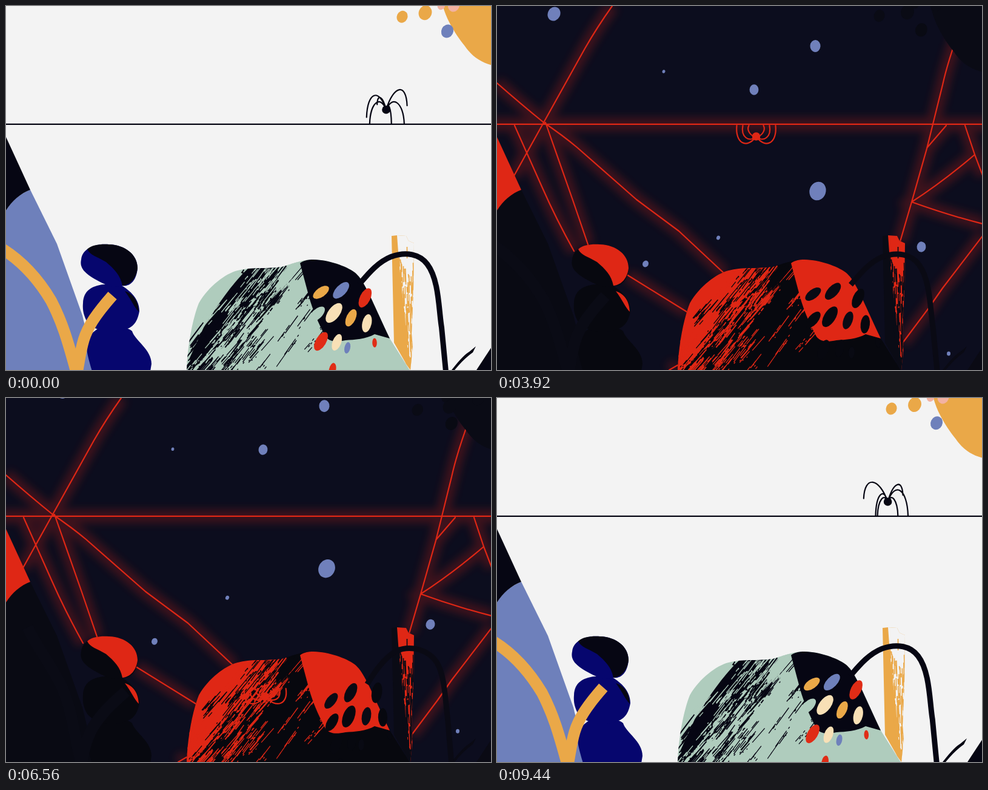
These frames come from a looping animation (800 px wide and 600 px high, 9.52 s). An HTML page:

```html
<!DOCTYPE html>
<html lang="en">
<head>
<meta charset="utf-8">
<title>Spider on a thread</title>
<style>
html, body { margin: 0; width: 100%; height: 100%; overflow: hidden; }
svg {
  display: block; width: 100vw; height: 100vh; background: var(--bg);
  --bg: #f3f3f3; --ink: #060613; --stem: #060613; --navy: #06066e; --blue: #6e80bb; --gold: #eaa848;
  --green: #afccbd; --red: #e02c16; --cream: #f8e0b6; --pink: #f3b2a2; --chalk: #f3f3f3;
}
svg.dark {
  --bg: #0c0d1e; --ink: #df2715; --chalk: #df2715; --stem: #0a0a14;
  --navy: #07080f; --blue: #090a13; --gold: #0a0b15; --green: #07080e;
  --red: #07080f; --cream: #07080f; --pink: #0a0b15;
}
.night { visibility: hidden; }
.dark .night { visibility: visible; }
.line { fill: none; stroke: var(--ink); stroke-width: 2.2; stroke-linecap: round; stroke-linejoin: round; }
.glow { fill: none; stroke: #df2715; stroke-width: 22; opacity: .23; }
.ink { fill: var(--ink); } .navy { fill: var(--navy); } .blue { fill: var(--blue); }
.gold { fill: var(--gold); } .green { fill: var(--green); } .red { fill: var(--red); }
.cream { fill: var(--cream); } .pink { fill: var(--pink); } .stem { fill: var(--stem); }
.star { fill: #7080bb; }
</style>
</head>
<body>
<svg id="stage" viewBox="0 0 800 600" preserveAspectRatio="none">
  <defs>
    <filter id="blur" filterUnits="userSpaceOnUse" x="-40" y="-40" width="880" height="680">
      <feGaussianBlur stdDeviation="7"/>
    </filter>
    <path id="rock" d="M298 602C299 560 308 515 318 490C334 462 362 441 382 436C402 430 430 434 455 430C475 424 490 418 505 418C530 418 560 428 575 439C592 452 605 490 633 548L667 602Z"/>
    <clipPath id="rockClip"><use href="#rock"/></clipPath>
    <path id="bar" d="M636 379L645 378L660 379L664 387L673 391L672 470L669 540L671 562L667 600L660 590L640 555Z"/>
    <clipPath id="barClip"><use href="#bar"/></clipPath>
    <path id="web" d="M190 0Q165 35 145 70L77 192L28 280M0 127Q40 162 77 192Q108 213 132 233L230 319L300 371L375 441M29 197L75 300Q97 350 127 404M80 192L125 320L150 393M216 444L313 504M284 600L298 592M770 20Q745 85 735 130L709 235L684 323L665 388M741 197L709 234M772 197L788 245L801 279M788 245Q735 290 684 323Q745 345 801 359M801 379L735 465L712 498L670 554"/>
  </defs>

  <g id="stars" class="night"></g>
  <g class="night">
    <g class="glow" filter="url(#blur)"><use href="#web"/><path d="M-40 195H840"/></g>
    <use href="#web" class="line"/>
  </g>
  <path class="line" d="M0 194.8H800"/>

  <path class="blue" d="M0 337C10 320 24 309 40 303L84 392L126 510L148 600H0Z"/>
  <path class="ink" d="M0 216L40 303C24 309 10 321 0 337Z"/>

  <path class="navy" d="M150 533C170 525 200 528 208 536C213 552 240 566 240 590L238 602H142C137 585 133 572 133 560C136 545 140 540 150 533Z"/>
  <path class="navy" d="M127 490C128 468 142 462 160 459H188C200 466 220 480 220 503C216 525 207 530 195 534C175 541 150 538 135 522C128 512 126 500 127 490Z"/>
  <path class="navy" d="M124 418C126 398 150 391 170 393C197 394 217 410 217 432C215 455 203 463 191 461C176 466 165 460 150 452C130 441 121 432 124 418Z"/>
  <path class="ink" d="M134 401C142 393 158 392 170 393C197 394 217 410 217 432C215 450 204 460 192 461C189 444 178 433 165 422C150 413 139 411 134 401Z"/>
  <path class="ink" d="M196 470C210 475 218 485 219 504C211 496 208 486 196 470Z"/>

  <use href="#bar" fill="var(--gold)"/>
  <path d="M645 378L660 379L664 387L673 391L672 470L669 540L671 562L667 600L662 560L656 500L648 420Z" fill="var(--chalk)"/>
  <path id="barScratch" clip-path="url(#barClip)" stroke="var(--gold)" stroke-width="1.7"/>

  <use href="#rock" fill="var(--green)"/>
  <g clip-path="url(#rockClip)" fill="none">
    <path class="ink night" d="M456 425L392 498L300 604H290V425Z"/>
    <path class="ink" d="M452 429L400 432C378 452 350 490 326 530L303 580L306 596C338 556 366 526 392 494C412 480 436 458 452 429Z"/>
    <g id="brush"></g>
  </g>
  <path class="ink" d="M485 424C492 418 505 418 505 418C530 418 560 428 575 439C592 452 605 490 633 548L608 541C594 549 575 550 560 551C545 554 534 554 527 545C518 528 508 508 500 480Z"/>

  <path class="stem" d="M776 600L801 562V600Z"/>
  <path class="stem" d="M735 600C745 588 754 576 764 570L775 561L770 571C760 578 750 588 740 600Z"/>
  <path id="vine" fill="none" stroke="var(--stem)" stroke-width="9"/>
  <g id="dots"></g>
  <path id="fork" fill="none" stroke="var(--gold)" stroke-width="19" stroke-linejoin="round"/>

  <path id="ball" class="gold" d="M716 -20C719 -5 724 12 732 27C740 42 748 54 757 65C770 84 784 92 802 97L840 100V-20Z"/>
  <g id="berries"></g>

  <g id="spider"><path id="legs" class="line"/><circle class="ink" r="6.8"/></g>
</svg>
<script>
const LOOP = 9520, STEP = 80, SWAY = LOOP / 2;
const NIGHT_START = 3280, NIGHT_END = 8400, FALL = 6000;
const $ = id => document.getElementById(id);
const lerp = (a, b, k) => a + (b - a) * k;
const clamp = k => Math.min(1, Math.max(0, k));
const wave = turns => Math.sin(2 * Math.PI * turns);
const swell = turns => (1 - Math.cos(2 * Math.PI * turns)) / 2;

// Interpolate every number in two paths of the same layout.
function morph(a, b, k) {
  const ends = b.match(/-?\d+/g);
  let i = 0;
  return a.replace(/-?\d+/g, v => lerp(+v, +ends[i++], k).toFixed(2));
}

function ellipse(parent, cls, rx, ry) {
  const node = document.createElementNS('http://www.w3.org/2000/svg', 'ellipse');
  node.setAttribute('class', cls);
  node.setAttribute('rx', rx);
  node.setAttribute('ry', ry);
  return parent.appendChild(node);
}
const place = (node, x, y, turn = 0) =>
  node.setAttribute('transform', `translate(${x} ${y}) rotate(${turn})`);

let seed = 11;
function rnd() {
  seed = (seed + 0x6D2B79F5) | 0;
  let r = Math.imul(seed ^ seed >>> 15, 1 | seed);
  r = r + Math.imul(r ^ r >>> 7, 61 | r) ^ r;
  return ((r ^ r >>> 14) >>> 0) / 4294967296;
}

// Dry brush: tufts of fine parallel hairs, placed along and across a diagonal band.
function brush(color, tufts, hairs, mid, spread, width, length) {
  let d = '';
  for (let i = 0; i < tufts; i++) {
    const along = rnd() * 1.15 - .1, across = mid + (rnd() + rnd() - 1) * spread;
    const angle = .9 + (rnd() - .5) * .12;
    for (let j = 0; j < hairs; j++) {
      const u = along + (rnd() - .5) * .2, v = across + (rnd() - .5) * hairs * 1.7;
      const x = 312 + 135 * u + v * .75, y = 578 - 145 * u + v * .66;
      const len = length * rnd() ** 2 + 2;
      d += `M${x.toFixed(1)} ${y.toFixed(1)}l${(len * Math.cos(angle)).toFixed(1)} ${(-len * Math.sin(angle)).toFixed(1)}`;
    }
  }
  $('brush').insertAdjacentHTML('beforeend',
    `<path d="${d}" stroke="var(--${color})" stroke-width="${width}"/>`);
}
brush('ink', 42, 9, 2, 42, 1.9, 42);
brush('ink', 22, 7, 45, 35, 1.3, 40);
brush('green', 26, 8, 0, 42, 1.3, 38);
brush('ink', 16, 5, 95, 60, 1.3, 36);

let scratch = '';
for (let i = 0; i < 190; i++) {
  const y = 388 + 205 * Math.sqrt(rnd());
  const x = 646 + (y - 388) * .07 + 24 * rnd() ** 1.8;
  scratch += `M${x.toFixed(1)} ${y.toFixed(1)}l${rnd().toFixed(1)} ${(6 + rnd() * 28).toFixed(1)}`;
}
$('barScratch').setAttribute('d', scratch);

// [color, size, x, y]
const dots = [
  ['green', 8.5, 513, 508], ['gold', 8, 519, 471], ['blue', 9, 552, 468], ['red', 9, 592, 481],
  ['cream', 10, 541, 506], ['gold', 8, 569, 514], ['cream', 8, 595, 523], ['red', 9, 517, 551],
  ['cream', 7.5, 543, 553], ['blue', 5, 559, 562], ['red', 4, 605, 555], ['red', 6, 527, 594]
].map(([cls, size, x, y]) => ({ node: ellipse($('dots'), cls, size * .95, size * 1.9), x, y }));

// [color, size, x, y, phase]
const berries = [
  ['gold', 9.5, 657, 18, -.02], ['gold', 11.5, 705, 12, -.08], ['pink', 10, 752, 0, -.08],
  ['pink', 6.5, 711, -1, .04], ['blue', 10.5, 721, 41, .04]
].map(([cls, size, x, y, phase]) =>
  ({ node: ellipse($('berries'), cls, size * .93, size * 1.07), x, y, phase }));

// Two drifting layers, each with its rise in px per second and stars as [x, y, size].
const stars = [
  { rise: 9, layer: [[94, 13, 11], [275, 108, 2.6], [529, 305, 14.4], [245, 425, 5.2], [700, 397, 8], [745, 573, 3.2]] },
  { rise: 20, layer: [[525, 66, 9.2], [424, 138, 8], [365, 382, 3.2]] }
].flatMap(({ rise, layer }) => layer.map(([x, y, size]) =>
  ({ node: ellipse($('stars'), 'star', size * .93, size * 1.08), x, y, rise })));

// A leg bends from the body through its top (ax, ay) down to its foot.
function leg(ax, ay, fx, fy) {
  const kx = (ax - fx / 8) / .75, ky = (ay - fy / 8) / .75;
  return `M0 0C${kx - fx * .3} ${ky - fy * .3} ${kx + fx * .3} ${ky + fy * .3} ${fx} ${fy}`;
}

// Three legs per side; n counts outward from the body.
function legPath(poseLeg) {
  let d = '';
  for (const side of [-1, 1])
    for (let n = 0; n < 3; n++) d += leg(...poseLeg(side, n));
  return d;
}

function walkingLeg(x, ground, effort) {
  return (side, n) => {
    const turn = x / 60 + n * .37 + side * .14;
    const lift = effort * Math.max(0, wave(turn)) * 34;
    const foot = side * (13 + 12 * n) + 5 * effort * wave(turn + .25);
    return [foot * .62, -4 - 7 * n - lift * .5, foot, ground - lift];
  };
}

function hangingLeg(crouch) {
  return (side, n) => [
    side * lerp(11 + 6 * n, 13 + 8 * n, crouch), lerp(8 * n - 6, 2 + 5 * n, crouch),
    side * lerp(12 + 10 * n, 13 + 12 * n, crouch), lerp(-18, -7, crouch)];
}

function drawSpider(t) {
  const now = t > LOOP - 900 ? t - LOOP : t;
  let x, y, pose;
  if (now < NIGHT_START) {
    const ahead = Math.exp(-now / 890);
    x = 440 + 187 * ahead;
    y = 171 + 6 * clamp((now - 1600) / 1000);
    pose = walkingLeg(x, 194 - y, clamp(Math.sqrt(ahead * 2)));
  } else {
    const crouch = swell((Math.min(now, FALL) - 3920) / 1173);
    x = 427.5;
    y = lerp(215, 203, crouch) + 900 * (Math.max(0, now - FALL) / 1000) ** 2;
    pose = hangingLeg(crouch);
  }
  place($('spider'), x, y);
  $('legs').setAttribute('d', legPath(pose));
}

function draw(t) {
  const turn = t / SWAY;
  $('stage').classList.toggle('dark', t >= NIGHT_START && t < NIGHT_END);

  $('vine').setAttribute('d', morph(
    'M582 458C596 442 612 422 635 413C660 404 682 409 694 425C714 451 713 500 718 530L725 602',
    'M596 472C606 456 622 430 644 417C668 407 697 415 711 436C724 456 725 500 729 530L735 602', swell(turn + .07)));
  $('fork').setAttribute('d', morph(
    'M-14 397C22 417 50 446 74 486C95 526 104 562 116 604M175 477C146 510 134 530 128 550C122 570 120 590 117 604',
    'M38 377C57 418 78 442 95 480C111 520 114 562 125 604M199 484C171 508 152 526 139 552C131 570 127 588 125 604', swell(turn + .05)));

  // The bunch turns about its stem; lower dots swing wider and later.
  for (const { node, x, y } of dots) {
    const k = swell(turn - (y - 505) * .0017);
    place(node, x + k * (18 + (y - 471) * .3), y + k * (30 - (x - 517) * .33), 62 - (x - 505) * .35 - (y - 465) * .3 - 18 * k);
  }

  const swing = wave(turn - .02);
  place($('ball'), 3 * swing, -13 * swing - 1);
  for (const { node, x, y, phase } of berries) {
    const w = wave(turn + phase);
    place(node, x + 28 * w, y + 2 * w, 25 + 8 * w);
  }
  for (const { node, x, y, rise } of stars)
    place(node, x, y - rise * (t - 3920) / 1000, 15 + 12 * Math.sin(t / 500 + x));
  drawSpider(t);
}

function tick() {
  draw(Math.floor(performance.now() % LOOP / STEP) * STEP);
  requestAnimationFrame(tick);
}
tick();
</script>
</body>
</html>
```
